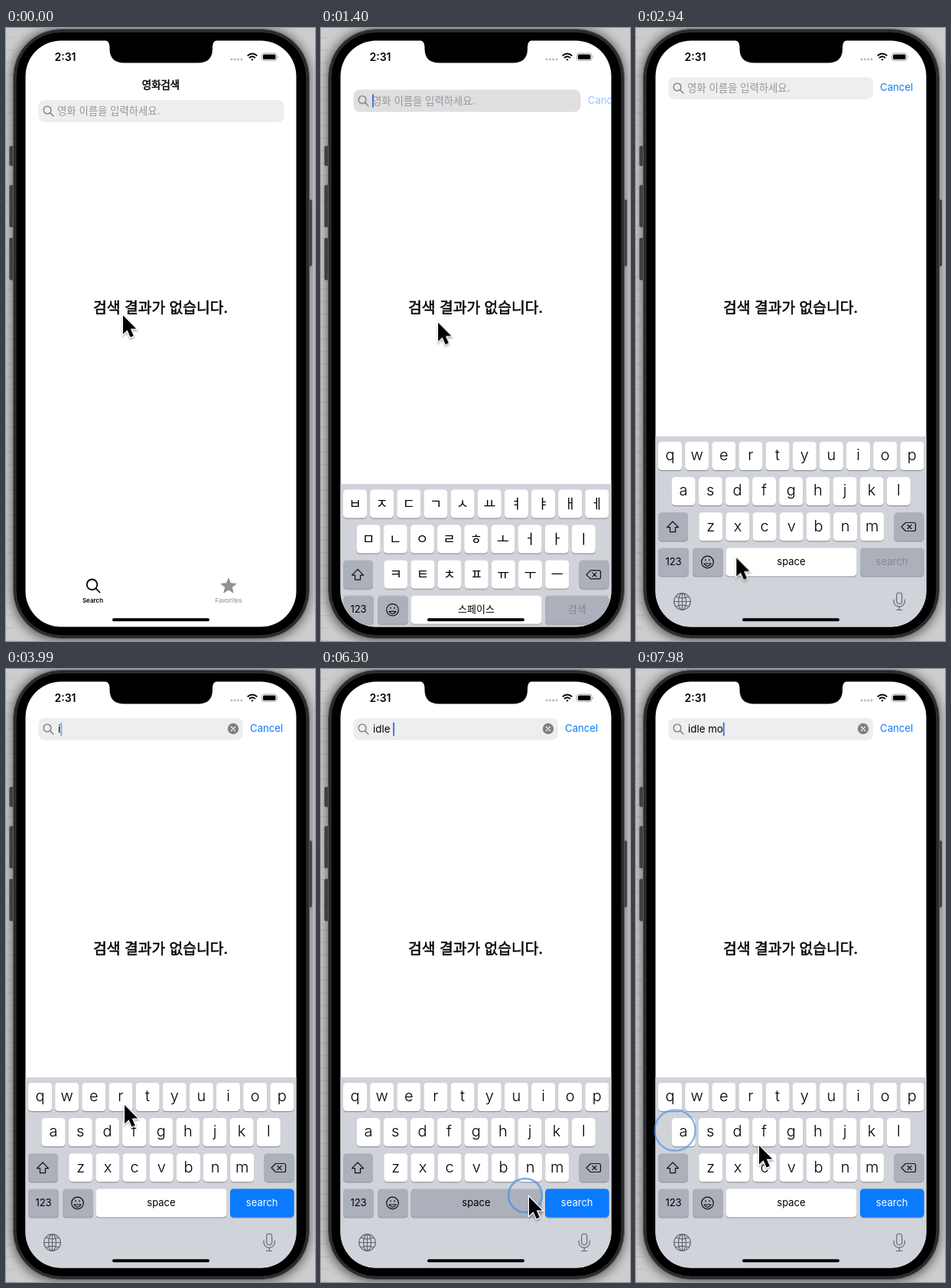
Write an HTML page that moves like this. It is 404 px wide and 800 px high and loops after 8000 ms.

```html
<!DOCTYPE html>
<html lang="ko">
<head>
<meta charset="utf-8">
<title>영화검색</title>
<style>
  html, body { margin: 0; width: 100%; height: 100%; overflow: hidden; background: #c9c9c9; }
  svg { display: block; width: 100%; height: 100%; }
  text { font-family: Inter, "Noto Sans CJK KR", "Noto Sans CJK", sans-serif; text-anchor: middle; }
  .left { text-anchor: start; }
  .line { fill: none; stroke-linecap: round; stroke-linejoin: round; }
  .ko { font-family: "Noto Sans CJK KR", "Noto Sans CJK", sans-serif; }
  .medium { stroke: #000; stroke-width: .5; }
  #query { white-space: pre; }
  #latin { font-weight: 300; }
</style>
</head>
<body>
<svg viewBox="0 0 404 800">
  <defs>
    <clipPath id="screen"><rect x="25.5" y="16.5" width="354" height="765" rx="46.5"/></clipPath>
    <filter id="blur" x="-20%" y="-20%" width="140%" height="140%"><feGaussianBlur stdDeviation="7"/></filter>
    <filter id="soft" x="-50%" y="-50%" width="200%" height="200%">
      <feDropShadow dx="0" dy="1.5" stdDeviation="1.3" flood-opacity=".4"/>
    </filter>
    <pattern id="paper" width="10" height="16.4" patternUnits="userSpaceOnUse">
      <path d="M0 12.5H10" stroke="#b8b8b8"/>
    </pattern>
  </defs>

  <rect width="404" height="800" fill="#cdcdcd"/>
  <rect width="10" height="800" fill="url(#paper)"/>
  <rect x="8" y="0" width="389" height="800" rx="62" opacity=".55" filter="url(#blur)"/>

  <g fill="#3f3f41" stroke="#626264" stroke-width=".6">
    <rect x="4.5" y="154" width="7" height="26" rx="2"/>
    <rect x="4.5" y="205" width="7" height="55" rx="2"/>
    <rect x="4.5" y="274" width="7" height="55" rx="2"/>
    <rect x="393" y="224" width="7" height="87" rx="2"/>
  </g>
  <rect x="9.5" y="1.5" width="387" height="795" rx="63" fill="#29292b" stroke="#59595b"/>
  <rect x="13" y="5" width="380" height="788" rx="59" stroke="#3b3b3d"/>

  <g clip-path="url(#screen)">
    <rect x="25" y="16" width="356" height="767" fill="#fff"/>
    <text id="title" class="ko medium" x="202.5" y="79" font-size="13.4">영화검색</text>
    <text class="ko medium" x="202" y="372" font-size="19.3">검색 결과가 없습니다.</text>

    <g class="line" stroke="#000" stroke-width="1.8">
      <circle cx="112.5" cy="726.3" r="6.8"/><path d="M117.5 731.3l5 5.2"/>
    </g>
    <text x="113.5" y="749.8" font-size="8" font-weight="600">Search</text>
    <path id="star" fill="#929292" stroke="#929292" stroke-linejoin="round"/>
    <text x="291" y="749.8" font-size="8" font-weight="500" fill="#999">Favorites</text>

    <g id="bar">
      <rect id="field" x="42.5" y="94" width="321" height="29" rx="8" fill="#eeeeef"/>
      <g class="line" stroke="#77777b" stroke-width="1.3">
        <circle cx="54" cy="107" r="4.9"/><path d="M57.7 110.7l4.2 4.3"/>
      </g>
      <text id="hint" class="ko left" x="67" y="113.3" font-size="13.4" fill="#97979b">영화 이름을 입력하세요.</text>
      <text id="query" class="left" x="68" y="113" font-size="13.3"></text>
      <rect id="caret" x="67" y="99.5" width="1.8" height="18" rx=".9" fill="#3b68d8"/>
      <g id="clear">
        <circle cx="297" cy="108" r="7.2" fill="#808084"/>
        <path class="line" d="M294.4 105.4l5.2 5.2m0-5.2l-5.2 5.2" stroke="#fff" stroke-width="1.3"/>
      </g>
      <text id="cancel" class="left" x="319" y="112.4" font-size="13.2" fill="#0a7cff">Cancel</text>
    </g>

    <g id="keyboard">
      <rect x="25" y="533" width="356" height="270" fill="#d0d3d9"/>
      <g id="keys"></g>
      <g id="korean"></g>
      <g id="latin"></g>
      <text x="49" y="701" font-size="13">123</text>
      <g class="line" stroke="#111" stroke-width="1.2">
        <path d="M48 644l7.5 7.7h-4v6h-7v-6h-4z"/>
        <path d="M352.5 645.5h11q2 0 2 2v7q0 2-2 2h-11l-5.5-5.5zM355 648.5l5 5m0-5l-5 5"/>
        <circle cx="93.5" cy="697" r="7.8"/>
        <path d="M88.8 699q4.7 6.6 9.4 0zM91 693.6v1.4M96 693.6v1.4"/>
      </g>
      <g class="line" stroke="#65686e" stroke-width="1.2">
        <circle cx="60.5" cy="748.5" r="10.8"/><ellipse cx="60.5" cy="748.5" rx="5" ry="10.8"/>
        <path d="M60.5 737.7v21.6M49.7 748.5h21.6M52.3 742q8.2 3.6 16.4 0M52.3 755q8.2-3.6 16.4 0"/>
        <rect x="340.7" y="737" width="7" height="14.5" rx="3.5"/>
        <path d="M337 746v2a7.2 7.2 0 0 0 14.4 0v-2M344.2 755.5v4M340.5 759.5h7.4"/>
      </g>
    </g>
    <rect x="139" y="770.3" width="127" height="4" rx="2"/>
  </g>

  <path d="M126 15Q135.5 16 135.5 24V27Q135.5 45.5 154.500 45.5H251Q270 45.5 270 27V24Q270 16 279 15Z"/>
  <text x="77.5" y="43" font-size="14" font-weight="600">2:31</text>
  <g fill="#b4b4b6">
    <circle cx="295" cy="41" r="1.4"/><circle cx="299.3" cy="41" r="1.4"/>
    <circle cx="303.6" cy="41" r="1.4"/><circle cx="308" cy="41" r="1.4"/>
  </g>
  <g class="line" stroke="#000" stroke-width="1.9" style="stroke-linecap:butt">
    <path d="M315.7 36.2q6.3-5.4 12.6 0M318 39q4-3.3 8 0"/>
    <path d="M320.3 40.9q1.7-1.3 3.4 0L322 42.7z" fill="#000" stroke="none"/>
  </g>
  <rect x="334.5" y="33" width="19.5" height="9.5" rx="2.8" fill="none" stroke="#a2a2a2"/>
  <rect x="336" y="34.5" width="16.5" height="6.5" rx="1.5"/>
  <path d="M355.5 36q1.8 1.7 0 3.5z" fill="#a2a2a2"/>

  <g id="pulses"></g>
  <g id="pointer" filter="url(#soft)">
    <path d="M0 0V24.5L5.6 19.2L9.6 28.5L13.8 26.7L9.8 17.6H17.3Z" stroke="#fff" stroke-width="2.4" paint-order="stroke"/>
  </g>
</svg>
<script>
const LOOP = 8000;
const OPEN = 1260, SWITCH = 2500;
const $ = id => document.getElementById(id);

function add(parent, tag, attrs, content = '') {
  const el = document.createElementNS('http://www.w3.org/2000/svg', tag);
  for (const name in attrs) el.setAttribute(name, attrs[name]);
  el.textContent = content;
  return parent.appendChild(el);
}

// rows: [time, value]; the first and last values are held to the loop's ends
function track(el, prop, rows, easing = 'linear') {
  const all = [[0, rows[0][1]], ...rows, [LOOP, rows.at(-1)[1]]];
  el.animate(all.map(([t, value]) => ({ offset: t / LOOP, [prop]: value, easing })),
    { duration: LOOP, iterations: Infinity });
}
const steps = (el, prop, rows) => track(el, prop, rows, 'steps(1, end)');
const showFrom = (el, t) => steps(el, 'opacity', [[0, 0], [t, 1]]);
const hideFrom = (el, t) => steps(el, 'opacity', [[0, 1], [t, 0]]);
const move = (x, y) => `translate(${x}px, ${y}px)`;

// Star
$('star').setAttribute('d', 'M' + Array.from({ length: 10 }, (_, i) => {
  const r = i % 2 ? 4.5 : 10.5, a = (i / 5 - 0.5) * Math.PI;
  return [291 + r * Math.cos(a), 728.5 + r * Math.sin(a)].map(v => v.toFixed(2));
}).join('L') + 'Z');

// Keyboard
const key = (parent, x, y, width, fill = '#fff') => {
  add(parent, 'rect', { x, y: y + 1.2, width, height: 37, rx: 4.5, fill: '#92959b' });
  return add(parent, 'rect', { x, y, width, height: 37, rx: 4.5, fill });
};
const GREY = '#abb0bb';
const layouts = [
  [$('korean'), ['ㅂㅈㄷㄱㅅㅛㅕㅑㅐㅔ', 'ㅁㄴㅇㄹㅎㅗㅓㅏㅣ', 'ㅋㅌㅊㅍㅠㅜㅡ'], 17.5, 'ko'],
  [$('latin'), ['qwertyuiop', 'asdfghjkl', 'zxcvbnm'], 20, '']
];
const rowLeft = [29, 46.6, 82.3], PITCH = 35.15;
layouts.forEach(([layer, rows, size, font], n) => rows.forEach((row, r) =>
  [...row].forEach((letter, i) => {
    const x = rowLeft[r] + i * PITCH, y = 540 + r * 46.1;
    if (!n) key($('keys'), x, y, 31);
    add(layer, 'text', { x: x + 15.5, y: y + 24.3, 'font-size': size, class: font }, letter);
  })));
for (const [x, y, w] of [[29, 632.2, 39], [337.5, 632.2, 39], [29, 678.4, 40], [74, 678.4, 40], [293, 678.4, 83.5]])
  key($('keys'), x, y, w, GREY);
const space = key($('keys'), 117.5, 678.4, 171);

const [korean, latin] = layouts.map(l => l[0]);
const label = (layer, x, text, fill, font = '') =>
  add(layer, 'text', { x, y: 700.6, 'font-size': 13, 'font-weight': 400, fill, class: font }, text);
label(korean, 203, '스페이스', '#000', 'ko');
label(korean, 334.7, '검색', '#85888f', 'ko');
label(latin, 203, 'space', '#000');
label(latin, 334.7, 'search', '#85888f');
const go = add(latin, 'g', {});
key(go, 293, 678.4, 83.5, '#0a7aff');
label(go, 334.7, 'search', '#fff');

hideFrom(korean, SWITCH);
showFrom(latin, SWITCH);
track($('keyboard'), 'transform', [[OPEN, move(0, 267)], [OPEN + 420, move(0, 0)]],
  'cubic-bezier(.2, .5, .2, 1)');

// Search bar
const slide = (el, prop, from, to) =>
  track(el, prop, [[OPEN, from], [OPEN + 300, to]], 'ease-in-out');
slide($('bar'), 'transform', move(0, 0), move(0, -30));
slide($('field'), 'width', '321px', '267.5px');
slide($('cancel'), 'transform', move(54, 0), move(0, 0));
slide($('cancel'), 'opacity', 0, 1);
track($('title'), 'opacity', [[OPEN, 1], [OPEN + 100, 0]]);
track($('field'), 'fill', [[950, '#eeeeef'], [1200, '#dfdfe1'], [1450, '#dfdfe1'], [2000, '#e9e9eb'], [2300, '#eeeeef']]);

// Typing
const typed = [['i', 3500], ['d', 4250], ['l', 5150], ['e', 5720], [' ', 6230], ['m', 6930], ['o', 7720]];
const FIRST = typed[0][1];
hideFrom($('hint'), FIRST);
showFrom($('clear'), FIRST);
showFrom(go, FIRST);
for (const [letter, at] of typed)
  steps(add($('query'), 'tspan', {}, letter), 'fillOpacity', [[0, 0], [at, 1]]);

const caretX = n => move(n ? $('query').getSubStringLength(0, n) + 1 : 0, 0);
steps($('caret'), 'transform', [[0, caretX(0)], ...typed.map(([, at], i) => [at, caretX(i + 1)])]);

const blink = [[0, 0], [OPEN, 0]];
const starts = [OPEN + 40, ...typed.map(t => t[1]), LOOP];
starts.slice(0, -1).forEach((start, i) => {
  for (let s = start; s < starts[i + 1]; s += 1000)
    for (const [dt, value] of [[0, 1], [400, 1], [620, 0], [800, 0], [950, 1]])
      if (s + dt < starts[i + 1]) blink.push([s + dt, value]);
});
track($('caret'), 'opacity', blink);

steps(space, 'fill', [[0, '#fff'], [6190, GREY], [6340, '#fff']]);

// Pointer
const path = [
  [0, 153, 375], [250, 153, 375], [780, 150, 110], [1020, 150, 112], [1400, 153, 384],
  [1890, 221, 765], [2330, 62, 749], [2750, 62, 749], [3300, 291, 559], [3600, 291, 559],
  [3990, 155, 569], [4080, 151, 561], [4400, 151, 561], [4900, 325, 559], [5220, 325, 559],
  [5460, 288, 650], [5600, 272, 652], [5850, 272, 652], [6140, 272, 689], [6420, 272, 689],
  [6780, 309, 652], [7050, 309, 652], [7580, 54, 603], [7780, 54, 603], [7980, 161, 622]
];
track($('pointer'), 'transform', path.map(([t, x, y]) => [t, move(x, y)]), 'cubic-bezier(.4, .2, .6, .8)');

const clicks = [
  [920, 150, 109], [2430, 60, 748], [3480, 289, 558], [4230, 149, 559], [5100, 323, 557],
  [5700, 270, 650], [6210, 267, 687], [6900, 307, 650], [7700, 51, 602]
];
const RING_LIFE = 300;
for (const [t, cx, cy] of clicks) {
  const ring = add($('pulses'), 'circle', { cx, cy, r: 18, fill: 'none', stroke: '#4a8fe6', 'stroke-width': 2.5 });
  track(ring, 'r', [[t, '18px'], [t + 90, '22px'], [t + RING_LIFE, '27px']]);
  track(ring, 'opacity', [[t, 0], [t + 30, .75], [t + RING_LIFE - 20, .65], [t + RING_LIFE, 0]]);
}
</script>
</body>
</html>
```
